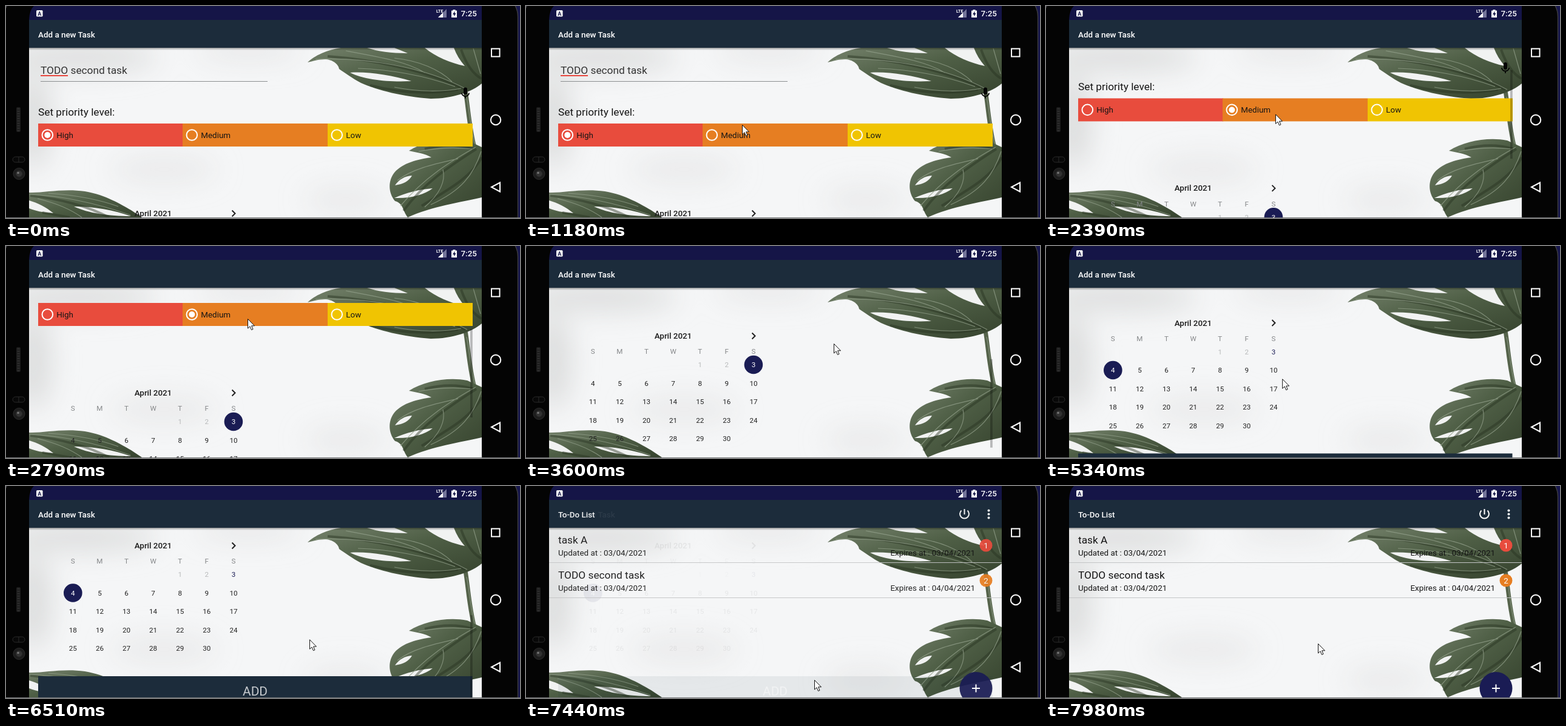
Write an HTML page that moves like this. It is 847 by 350 pixels and loops after 8 s.

```html
<!DOCTYPE html>
<html lang="en">
<head>
<meta charset="utf-8">
<title>Task planner</title>
<style>
html, body { margin: 0; width: 100%; height: 100%; overflow: hidden; background: #000; }
svg { display: block; width: 847px; height: 350px; font-family: Roboto, "Noto Sans", sans-serif; }
.h { font-size: 17.3px; fill: #151515; }
.b { font-size: 13.4px; fill: #151515; }
.m { font-size: 13.4px; font-weight: 500; }
.c { font-size: 11.6px; text-anchor: middle; }
.w { fill: #fff; }
.line { fill: none; stroke: #fff; stroke-width: 2; }
.vein { fill: none; stroke: #93a08b; stroke-width: 1.2; opacity: .75; }
.dark { fill: none; stroke: #27321f; stroke-width: 4; opacity: .45; }
.gap { fill: #f1f2f2; }
</style>
</head>
<body>
<svg viewBox="0 0 847 350">
  <defs>
    <linearGradient id="leaf" x1="0" y1="0" x2="1" y2="1">
      <stop offset="0" stop-color="#75826c"/>
      <stop offset=".45" stop-color="#4f5f46"/>
      <stop offset="1" stop-color="#35422d"/>
    </linearGradient>
    <linearGradient id="shade" x2="0" y2="1">
      <stop offset="0" stop-color="#000" stop-opacity=".35"/>
      <stop offset="1" stop-color="#000" stop-opacity="0"/>
    </linearGradient>
    <filter id="soft" x="-50%" y="-50%" width="200%" height="200%"><feGaussianBlur stdDeviation="22"/></filter>
    <clipPath id="screen"><rect x="38" y="69" width="746" height="280"/></clipPath>
    <clipPath id="view"><rect x="52" y="84" width="717" height="265"/></clipPath>
  </defs>

  <!-- phone body -->
  <rect width="847" height="350" fill="#15154a"/>
  <rect x="-3" y="-22" width="846.5" height="420" rx="40" fill="#040404" stroke="#3c3c40" stroke-width="1.5"/>
  <rect x="17" y="167" width="7" height="41" rx="2" fill="#1d1d1d"/>
  <path d="M20.500 169V207" stroke="#333" stroke-width="4" stroke-dasharray="1.500 2.500"/>
  <g fill="#080808" stroke="#2b2b2b">
    <rect x="11" y="249" width="20" height="9" rx="4.500"/>
    <path d="M21 249V258"/>
    <circle cx="21.500" cy="277" r="9.500" fill="#1c1c1c"/>
    <circle cx="21.500" cy="277" r="5" fill="#333"/>
  </g>
  <circle cx="20" cy="275.500" r="1.800" fill="#777"/>
  <g class="line">
    <rect x="800" y="70.500" width="13.500" height="13"/>
    <circle cx="807" cy="188" r="8.200"/>
    <path d="M800 299L814 291.500V306.500Z"/>
  </g>

  <!-- wallpaper -->
  <g clip-path="url(#screen)">
    <rect x="38" y="69" width="746" height="281" fill="#f5f6f7"/>
    <g filter="url(#soft)" fill="#dcdddd">
      <ellipse cx="120" cy="85" rx="130" ry="22"/>
      <ellipse cx="45" cy="190" rx="30" ry="80"/>
      <ellipse cx="260" cy="270" rx="90" ry="25" opacity=".4"/>
      <ellipse cx="560" cy="320" rx="70" ry="25" opacity=".4"/>
      <ellipse cx="400" cy="75" rx="90" ry="14" opacity=".6"/>
    </g>
    <path d="M757 140C762 170 763 200 773 238" fill="none" stroke="#55634b" stroke-width="7"/>
    <path d="M759 150C764 175 765 200 774 235" class="vein"/>

    <path fill="url(#leaf)" d="M497 93C508 82 530 72 552 69H784V128C768 142 735 153 700 153C655 150 612 139 585 127C570 119 558 110 549 104C548 96 538 88 525 88C515 88 506 91 497 93Z"/>
    <path class="gap" d="M690 69H738C742 80 748 90 756 99C732 94 708 84 690 69ZM567 110C595 108 635 114 668 124C632 126 590 122 567 110ZM595 69H640L662 78C635 78 612 75 595 69Z"/>
    <path class="dark" d="M530 83C600 88 690 105 757 138M600 131C650 144 700 146 745 138M750 72C758 95 768 112 784 120"/>
    <path class="vein" d="M510 88C590 84 690 100 760 138M560 74C620 85 660 92 690 110M640 86C680 90 715 105 735 125M580 103C640 105 690 115 740 133M640 134C680 142 720 142 750 136M770 70L782 112"/>

    <path fill="url(#leaf)" d="M664 239C690 223 728 216 760 222L784 233V316C750 324 700 331 662 349C653 337 655 326 641 322C630 309 629 289 640 275C654 259 678 253 701 250C690 243 676 242 664 239Z"/>
    <path class="gap" d="M641 296C648 286 657 281 669 280C664 289 655 294 641 296ZM640 317C660 308 680 303 703 301C690 311 668 318 640 317Z"/>
    <path class="dark" d="M775 236C735 262 690 290 655 338M784 250C765 285 725 305 685 330M690 236C720 228 745 228 770 236"/>
    <path class="vein" d="M774 233C735 255 690 282 650 330M768 236C730 232 700 236 680 240M745 252C710 260 670 268 645 288M783 240C770 280 750 305 700 328M720 270C725 290 715 310 690 332"/>

    <path fill="url(#leaf)" d="M38 308C62 309 92 301 130 306C165 312 190 328 206 337L224 349H38Z"/>
    <path class="gap" d="M38 321C52 325 66 332 78 342C60 341 48 338 38 334ZM112 331C145 331 178 337 206 347C170 347 135 342 112 331Z"/>
    <path class="dark" d="M40 313C85 318 130 328 170 349M60 341L105 349"/>
    <path class="vein" d="M38 311C90 313 150 326 205 345M70 309C110 312 150 318 185 331M52 318C85 326 110 338 125 349"/>
  </g>

  <!-- bars -->
  <rect x="38" width="746" height="23" fill="#151547"/>
  <path d="M38 0H46Q39 6 38 22Z" fill="#040404"/>
  <rect x="38" y="23" width="746" height="46" fill="#1c2c3b"/>
  <rect x="38" y="69" width="746" height="4" fill="url(#shade)"/>
  <rect x="50" y="7" width="10.500" height="10.500" rx="1.500" class="w"/>
  <text x="55.300" y="15.500" text-anchor="middle" font-size="9" font-weight="700" fill="#151547">A</text>
  <text x="709" y="11" font-size="7" font-weight="700" class="w">LTE</text>
  <path d="M712 19L726 5V19Z" fill="#74749a"/>
  <path d="M712 19L720 11V19Z" class="w"/>
  <path d="M736.500 6H740.500V7.500H743V19H734V7.500H736.500Z" class="w"/>
  <path d="M739.500 8.500L736 14H738.300V17.500L741.500 12H739.500Z" fill="#151547"/>
  <text x="749.500" y="17" class="m w">7:25</text>

  <!-- task form -->
  <g id="form">
    <text x="53" y="51.500" class="m w">Add a new Task</text>
    <g clip-path="url(#view)">
      <g id="content">
        <text x="57" y="112" class="h" style="fill:#333">TODO second task</text>
        <path d="M57 115H102" stroke="#e8483f" stroke-width="2"/>
        <path d="M57 124.500H431" stroke="#8b8e90"/>
        <g transform="translate(757 143.500)" stroke="#050505" fill="none">
          <path d="M0 -6V0" stroke-width="6" stroke-linecap="round"/>
          <path d="M-6 0A6 5.500 0 0 0 6 0M0 5.500V9" stroke-width="1.800"/>
        </g>
        <text x="53" y="181" class="h">Set priority level:</text>
        <g id="levels"></g>
        <text x="242.500" y="347" class="m" text-anchor="middle" fill="#1c1c1c">April 2021</text>
        <path d="M372.500 337.500L377.500 342.500L372.500 347.500" fill="none" stroke="#222" stroke-width="2"/>
        <circle id="pick" r="15.300" fill="#1a1c54"/>
        <g id="days"></g>
        <rect x="53" y="558" width="715.500" height="60" fill="#1c2c3b"/>
        <text x="390" y="590" font-size="20.900" fill="#c6cace">ADD</text>
      </g>
      <rect id="thumb" x="765" width="3.800" height="146" fill="#000" opacity=".25"/>
    </g>
  </g>

  <!-- task list -->
  <g id="list">
    <text x="53" y="51.500" class="m w">To-Do List</text>
    <path class="line" d="M717.500 40.500A7.500 7.500 0 1 0 727.500 40.500M722.500 38V47"/>
    <g class="w"><circle cx="762.500" cy="40.500" r="2"/><circle cx="762.500" cy="46.500" r="2"/><circle cx="762.500" cy="52.500" r="2"/></g>
    <g id="rows"></g>
    <g clip-path="url(#screen)">
      <circle cx="741.500" cy="334" r="27" fill="#1a1c54"/>
      <path class="line" d="M735 334H748M741.500 327.500V340.500"/>
    </g>
  </g>

  <path id="cursor" d="M.5 .5V16L4 12.700L6.500 18.500L9 17.400L6.600 11.800H11.500Z" fill="#fff" stroke="#111"/>
  <rect y="349" width="847" height="1" fill="#77797b"/>
</svg>
<script>
const $ = id => document.getElementById(id);
const LOOP = 8000;

const bursts = [[0, 0, 1], [250, 1180, 8], [1330, 1330, 1], [1610, 2510, 8], [2660, 3600, 8], [3720, 4680, 8],
  [4800, 5700, 8], [5850, 6780, 8], [6900, 7860, 7], [7980, 7980, 1]];
const ticks = bursts.flatMap(([from, to, n]) =>
  Array.from({ length: n }, (_, i) => n > 1 ? from + (to - from) * i / (n - 1) : from));

const pointer = [[250, 191, 271], [1180, 356, 196], [1330, 356, 204], [1610, 356, 204], [2000, 374, 222],
  [2130, 376, 220], [2390, 378, 177], [2660, 398, 120], [3080, 480, 255], [3600, 507, 161], [3720, 508, 141],
  [3860, 490, 150], [4500, 113, 204], [4800, 113, 204], [5340, 403, 220], [5470, 440, 246], [5700, 470, 222],
  [5850, 475, 217], [6510, 506, 262], [6780, 480, 322], [7300, 476, 324], [7860, 469, 296], [7980, 448, 260]];
const scroll = [[2130, 0], [2390, 43], [2660, 100], [3080, 110], [3600, 194], [3720, 215.5],
  [5470, 215.5], [5700, 239], [5850, 244]];
const thumbFade = [[2130, 0], [2250, .25], [3720, .25], [4050, 0], [5470, 0], [5600, .25], [6510, .25], [6700, 0]];
const swap = [[7100, 0], [7400, 1]];

// Linear value of column k in a list of [time, ...values].
function at(keys, t, k = 1) {
  const i = keys.findIndex(key => key[0] > t);
  if (i === 0) return keys[0][k];
  if (i < 0) return keys[keys.length - 1][k];
  const a = keys[i - 1], b = keys[i];
  return a[k] + (b[k] - a[k]) * (t - a[0]) / (b[0] - a[0]);
}

$('levels').innerHTML = [['High', '#e84c3d', 53], ['Medium', '#e67e22', 291], ['Low', '#f0c402', 530]].map(([name, color, x]) =>
  `<rect x="${x}" y="194" width="239" height="38" fill="${color}"/>
   <circle cx="${x + 15.3}" cy="213" r="8.800" class="line"/>
   <circle cx="${x + 15.3}" cy="213" r="5" class="w dot"/>
   <text x="${x + 30.3}" y="218" class="b">${name}</text>`).join('');
const dots = document.querySelectorAll('.dot');

const cellX = col => 110.3 + 44.1 * col;
const cellY = row => 390 + 30.5 * row;
const label = (x, y, text, fill) => `<text x="${x}" y="${y + 4.2}" class="c" fill="${fill}">${text}</text>`;
let cells = [...'SMTWTFS'].map((d, i) => label(cellX(i), 368, d, '#858789')).join('');
for (let d = 1; d <= 30; d++) {
  const n = d + 3;
  cells += label(cellX(n % 7), cellY(Math.floor(n / 7)), d, d < 3 ? '#b8babb' : '#222');
}
$('days').innerHTML = cells;
const [third, fourth] = [9, 10].map(i => $('days').children[i]);

$('rows').innerHTML = [['task A', '03', '#e84c3d'], ['TODO second task', '04', '#e67e22']].map(([name, day, color], i) =>
  `<g transform="translate(0 ${58 * i})">
     <text x="53" y="95" class="h">${name}</text>
     <text x="53" y="115" class="b">Updated at : 03/04/2021</text>
     <text x="740" y="115" class="b" text-anchor="end">Expires at : ${day}/04/2021</text>
     <circle cx="758" cy="98" r="10.500" fill="${color}"/>
     <text x="758" y="102.700" class="b" text-anchor="middle" style="fill:#fff">${i + 1}</text>
     <path d="M38 126.500H784" stroke="#c3c5c6"/>
   </g>`).join('');

function draw(now) {
  const clock = now % LOOP;
  const t = ticks.findLast(tick => tick <= clock);
  const y = at(scroll, t), shown = at(swap, t), picked = t >= 4680;

  $('content').setAttribute('transform', `translate(0 ${-y})`);
  $('thumb').setAttribute('y', 84 + y * .53);
  $('thumb').setAttribute('opacity', at(thumbFade, t));
  dots.forEach((dot, i) => dot.setAttribute('opacity', i === (t < 1610 ? 0 : 1) ? 1 : 0));

  $('pick').setAttribute('cx', cellX(picked ? 0 : 6));
  $('pick').setAttribute('cy', cellY(picked ? 1 : 0));
  third.setAttribute('fill', picked ? '#1a1c54' : '#fff');
  fourth.setAttribute('fill', picked ? '#fff' : '#222');

  $('form').setAttribute('opacity', 1 - shown);
  $('list').setAttribute('opacity', shown);
  $('cursor').setAttribute('opacity', t < 250 ? 0 : 1);
  $('cursor').setAttribute('transform', `translate(${at(pointer, t)} ${at(pointer, t, 2)})`);
}

const start = performance.now();
function frame() {
  draw(performance.now() - start);
  requestAnimationFrame(frame);
}
frame();
</script>
</body>
</html>
```
